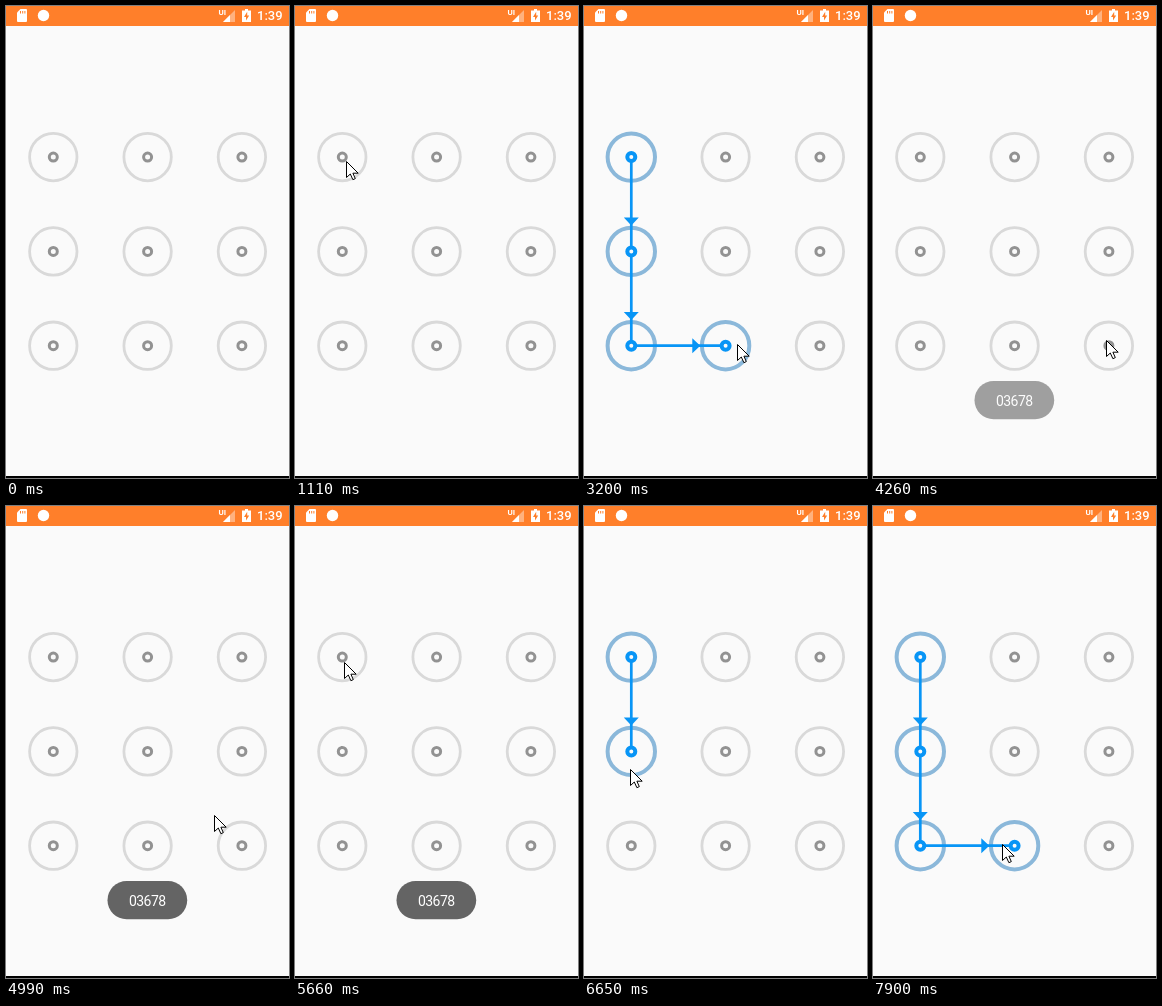
These frames come from a looping animation (283x472 px, 8 s). An HTML page:

```html
<!DOCTYPE html>
<html lang="en">
<head>
<meta charset="utf-8">
<title>Pattern lock</title>
<style>
  html, body { margin: 0; width: 100%; height: 100%; overflow: hidden; background: #fafafa; }
  svg { display: block; width: 283px; height: 472px; }
  text { font-family: Roboto, sans-serif; fill: #fff; }
  .ring { fill: none; stroke: #d9d9d9; stroke-width: 2.8; }
  .dot { fill: #fafafa; stroke: #929292; stroke-width: 3; }
  .ring.on { stroke: #8bb8da; stroke-width: 4; }
  .dot.on { stroke: #0895f6; stroke-width: 4; }
  .line { fill: none; stroke: #0895f6; stroke-width: 2.7; stroke-linejoin: round; stroke-linecap: round; }
</style>
</head>
<body>
<svg viewBox="0 0 283 472">
  <rect width="283" height="472" fill="#fafafa"/>
  <rect width="283" height="20" fill="#ff7f2a"/>
  <rect y="470" width="283" height="2"/>

  <g fill="#fff">
    <path d="M14.5 3H20a1 1 0 0 1 1 1V15a1 1 0 0 1-1 1H12a1 1 0 0 1-1-1V6.5Z"/>
    <path d="M14.5 5v2.5M16.7 5v2.5M18.9 5v2.5" stroke="#ff7f2a"/>
    <circle cx="37.5" cy="9.5" r="5.7"/>
    <text x="212.5" y="9" font-size="8" font-weight="700">UI</text>
    <path d="M229 4V16H217Z" opacity=".4"/>
    <path d="M224 9V16H217Z"/>
    <path d="M239 3h3v1.4h3V16h-9V4.4h3Z"/>
    <path d="M241.2 5.8 238 11h2v3.5L243.2 9.4h-2Z" fill="#ff7f2a"/>
    <text x="251" y="14" font-size="13" font-weight="500">1:39</text>
  </g>

  <g id="rings"></g>
  <path id="trail" class="line"/>
  <path id="tail" class="line"/>
  <path id="arrows" fill="#0895f6"/>
  <g id="dots"></g>

  <g id="toast">
    <rect x="101.5" y="375" width="79.700" height="38.300" rx="19.150" fill="#646464"/>
    <text x="141.300" y="400" font-size="14" letter-spacing="-.5" text-anchor="middle">03678</text>
  </g>
  <path id="cursor" d="M.5.5V16.500L4.300 13 6.900 18.700 9.300 17.600 6.900 12.200H12.200Z" fill="#fff" stroke="#000"/>
</svg>
<script>
const LOOP = 8000, STEP = 137.5, PHASE = 570;
const SPACING = 94.3, HIT = 0.3 * SPACING, LAG = 45;
const APPEAR = 590, TOAST_IN = 4075, TOAST_OUT = 6060, FADE = 500;
const strokes = [{ start: 1130, end: 3860 }, { start: 6080, end: LOOP }];

// Turning points of the pointer: time, x, y
const pointer = [
  [APPEAR, 132, 190], [1000, 47, 153], [1330, 47, 150], [1945, 51, 312],
  [2200, 52, 338], [3182, 153, 338], [3730, 233, 334], [4860, 233, 334],
  [5657, 49, 156], [6120, 46, 150], [6620, 46, 263], [7100, 44, 335],
  [7857, 129, 338]
];

const $ = id => document.getElementById(id);
const clamp = v => Math.max(0, Math.min(1, v));
const distance = (a, b) => Math.hypot(a[0] - b[0], a[1] - b[1]);
const centers = Array.from({ length: 9 }, (_, i) =>
  [47.3 + i % 3 * SPACING, 151.1 + Math.floor(i / 3) * SPACING]);

function addCircles(name, radius) {
  return centers.map(([x, y]) => {
    const circle = document.createElementNS("http://www.w3.org/2000/svg", "circle");
    circle.setAttribute("cx", x);
    circle.setAttribute("cy", y);
    circle.setAttribute("r", radius);
    circle.setAttribute("class", name);
    return $(name + "s").appendChild(circle);
  });
}
const rings = addCircles("ring", 23.7), dots = addCircles("dot", 4);

// The screen refreshes in even steps
const snap = t => PHASE + Math.floor((t - PHASE) / STEP) * STEP;

function pointerAt(t) {
  const next = pointer.findIndex(p => p[0] > t);
  if (next < 0) return pointer.at(-1).slice(1);
  if (next === 0) return pointer[0].slice(1);
  const [t0, x0, y0] = pointer[next - 1], [t1, x1, y1] = pointer[next];
  const k = (t - t0) / (t1 - t0);
  return [x0 + (x1 - x0) * k, y0 + (y1 - y0) * k];
}

const fingerAt = t => pointerAt(t - LAG);

// Every dot the finger has come close to since it was pressed down
function pickedAt(t) {
  const stroke = strokes.find(s => t >= s.start && t < s.end);
  const picked = new Set();
  if (stroke) {
    for (let s = snap(stroke.start) + STEP; s <= t; s += STEP) {
      const hit = centers.findIndex(c => distance(c, fingerAt(s)) < HIT);
      if (hit >= 0) picked.add(hit);
    }
  }
  return [...picked];
}

function arrow(from, to) {
  const [x, y] = centers[from];
  return to - from === 3
    ? `M${x - 7.5} ${y + 60.5}h15l-7.5 8Z`
    : `M${x + 61} ${y - 7.5}v15l8-7.5Z`;
}

function drawPattern(t) {
  const picked = pickedAt(t);
  for (const circles of [rings, dots]) {
    circles.forEach((c, i) => c.classList.toggle("on", picked.includes(i)));
  }
  const path = picked.map(i => centers[i]);
  $("trail").setAttribute("d", path.length ? "M" + path.join("L") : "");
  $("arrows").setAttribute("d", picked.slice(1).map((dot, i) => arrow(picked[i], dot)).join(""));

  // The loose end fades in as the finger leaves the last dot
  const last = path.at(-1), finger = fingerAt(t);
  $("tail").setAttribute("d", last ? `M${last}L${finger}` : "");
  if (last) {
    $("tail").setAttribute("opacity", clamp((distance(last, finger) - HIT) / SPACING * 4));
  }
}

function draw(time) {
  const t = snap(time);
  drawPattern(t);

  const fadeIn = 1 - (1 - clamp((time - TOAST_IN) / FADE)) ** 2;
  const fadeOut = clamp((time - TOAST_OUT) / FADE) ** 2;
  $("toast").setAttribute("opacity", fadeIn * (1 - fadeOut));

  const [x, y] = pointerAt(t).map(Math.round);
  $("cursor").setAttribute("transform", `translate(${x} ${y})`);
  $("cursor").setAttribute("visibility", time >= APPEAR ? "visible" : "hidden");
}

const origin = performance.now();
function tick() {
  draw((performance.now() - origin) % LOOP);
  requestAnimationFrame(tick);
}
tick();
</script>
</body>
</html>
```
